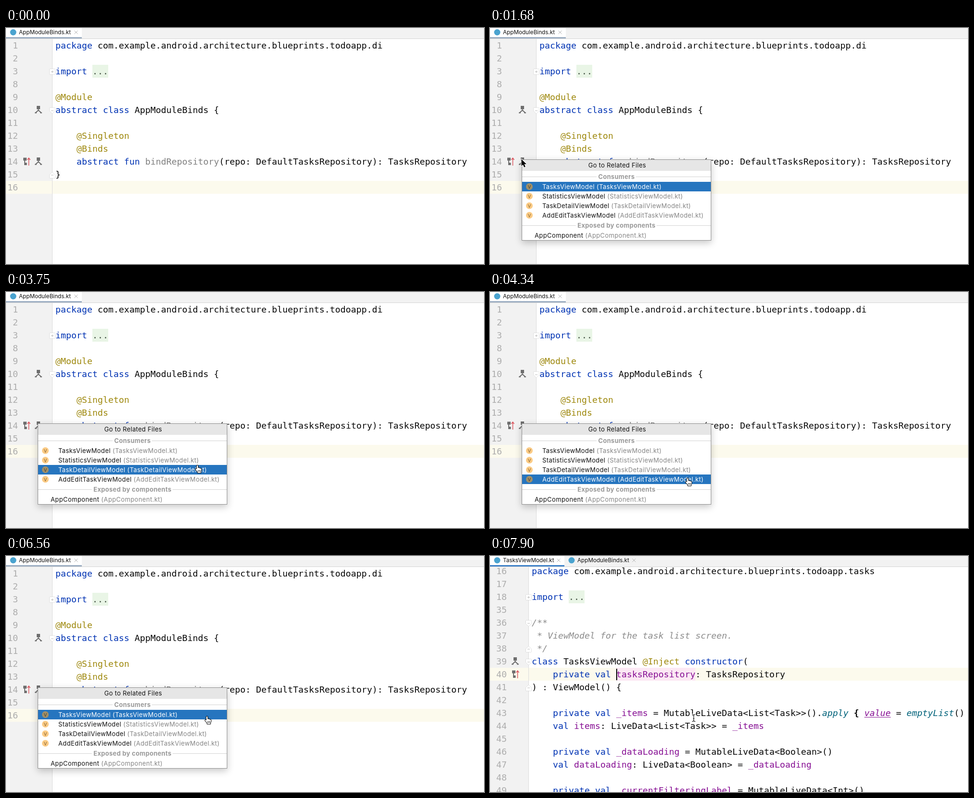
Write an HTML page with a canvas that moves like this. It is 996 by 494 pixels and loops after 8 s.

```html
<!DOCTYPE html>
<html lang="en">
<head>
<meta charset="utf-8">
<title>Go to related files</title>
<style>
html, body { margin: 0; width: 100%; height: 100%; overflow: hidden; background: #fff; }
canvas { display: block; }
</style>
</head>
<body>
<canvas id="stage" width="996" height="494"></canvas>
<script>
const ctx = document.getElementById('stage').getContext('2d');
const W = 996, H = 494, LOOP = 8000;
const CELL = 11, ROW = 27;
const MONO = '18.27px "DejaVu Sans Mono", monospace';
const POPUP_AT = 1680, OPEN_AT = 6860, HIGHLIGHT_AT = 7160, IBEAM_AT = 7900;

// Code markup: ‹style text›
const STYLES = {
  k: { color: '#0033b3' },
  a: { color: '#9e880d' },
  g: { color: '#808080' },
  c: { color: '#8c8c8c', font: 'italic ' },
  p: { color: '#871094' },
  v: { color: '#871094', font: 'italic ', underline: true },
  f: { color: '#00627a', font: 'italic ' },
  b: { color: '#080808', font: 'bold ' },
  d: { color: '#3b4a3b', box: '#e9f5e6' },
  h: { color: '#871094', hot: '#fce8f4' }
};

// Rows: line number, code, fold marker, gutter icons
const bindsFile = {
  top: 23, left: 103, gutter: 96, numberRight: 25, caretRow: 11, daggerX: 67, arrowX: 36,
  rows: [
    [1, '‹k package› com.example.android.architecture.blueprints.todoapp.di'],
    [2, ''],
    [3, '‹k import› ‹d ...›', 'plus'],
    [8, ''],
    [9, '‹a @Module›'],
    [10, '‹k abstract class› AppModuleBinds {', 'down', 'D'],
    [11, ''],
    [12, '    ‹a @Singleton›'],
    [13, '    ‹a @Binds›'],
    [14, '    ‹k abstract fun› ‹g bindRepository›(repo: DefaultTasksRepository): TasksRepository', '', 'DA'],
    [15, '}', 'up'],
    [16, '']
  ]
};
const tasksFile = {
  top: 18, left: 87, gutter: 80, numberRight: 35, caretRow: 8, daggerX: 52, arrowX: 46, caretColumn: 16,
  rows: [
    [16, '‹k package› com.example.android.architecture.blueprints.todoapp.tasks'],
    [17, ''],
    [18, '‹k import› ‹d ...›', 'plus'],
    [35, ''],
    [36, '‹c /**›', 'down'],
    [37, '‹c  * ViewModel for the task list screen.›'],
    [38, '‹c  */›', 'up'],
    [39, '‹k class› TasksViewModel ‹a @Inject› ‹k constructor›(', 'down', 'D'],
    [40, '    ‹k private val› ‹h tasksRepository›: TasksRepository', '', 'A'],
    [41, ') : ViewModel() {', 'up'],
    [42, ''],
    [43, '    ‹k private val› ‹p _items› = MutableLiveData<List<Task>>().‹f apply› ‹b {› ‹v value› = ‹f emptyList›()'],
    [44, '    ‹k val› ‹p items›: LiveData<List<Task>> = ‹p _items›'],
    [45, ''],
    [46, '    ‹k private val› ‹p _dataLoading› = MutableLiveData<Boolean>()'],
    [47, '    ‹k val› ‹p dataLoading›: LiveData<Boolean> = ‹p _dataLoading›'],
    [48, ''],
    [49, '    ‹k private val› ‹p _currentFilteringLabel› = MutableLiveData<Int>()']
  ]
};

const popupRows = [
  ['TasksViewModel', 322], ['StatisticsViewModel', 342], ['TaskDetailViewModel', 362],
  ['AddEditTaskViewModel', 382], ['AppComponent', 424]
];

// Stepped pointer moves; points are [progress, x, y]
const moves = [
  { start: 500, end: 1380, steps: 7, points: [[0, 161, 404], [.143, 156, 404], [.45, 110, 320], [.8, 68, 248], [1, 65, 274]] },
  { start: 2280, end: 3310, steps: 8, points: [[0, 65, 274], [.625, 253, 325], [1, 385, 341]] },
  { start: 3460, end: 4490, steps: 8, points: [[0, 385, 341], [.875, 407, 389], [1, 407, 394]] },
  { start: 4640, end: 4780, steps: 2, points: [[0, 407, 394], [.5, 407, 397], [1, 407, 396]] },
  { start: 5820, end: 6560, steps: 6, points: [[0, 407, 396], [.167, 407, 396], [1, 414, 335]] }
];

function pointerAt(t) {
  const move = moves.filter(m => t >= m.start).pop();
  if (!move) return null;
  const { start, end, steps, points } = move;
  const step = Math.floor((t - start) / (end - start) * (steps - 1) + 0.1) + 1;
  const u = Math.min(1, step / steps);
  const i = Math.max(1, points.findIndex(p => p[0] >= u));
  const [u0, x0, y0] = points[i - 1], [u1, x1, y1] = points[i];
  const k = (u - u0) / (u1 - u0);
  return { x: Math.round(x0 + (x1 - x0) * k), y: Math.round(y0 + (y1 - y0) * k) };
}

function rect(x, y, w, h, color) {
  ctx.fillStyle = color;
  ctx.fillRect(x, y, w, h);
}

function text(value, x, y, color, font, align = 'left', spacing = 0) {
  ctx.font = font;
  ctx.textAlign = align;
  ctx.letterSpacing = spacing + 'px';
  ctx.fillStyle = color;
  ctx.fillText(value, x, y);
  return ctx.measureText(value).width;
}

function shape(path, x, y, fill, stroke, width = 1) {
  const p = new Path2D(path);
  ctx.save();
  ctx.translate(x, y);
  ctx.lineWidth = width;
  ctx.lineJoin = 'round';
  if (stroke) { ctx.strokeStyle = stroke; ctx.stroke(p); }
  if (fill) { ctx.fillStyle = fill; ctx.fill(p); }
  ctx.restore();
}

function circle(x, y, r, color) {
  ctx.beginPath();
  ctx.arc(x, y, r, 0, 7);
  ctx.fillStyle = color;
  ctx.fill();
}

function drawCode(code, left, top, highlighted) {
  let column = 0;
  for (const [, key, styled, plain] of code.matchAll(/‹(\w) ([^›]*)›|([^‹]+)/g)) {
    const value = styled ?? plain;
    const style = STYLES[key] || { color: '#080808' };
    const x = left + column * CELL, width = value.length * CELL;
    const back = style.box || (highlighted && style.hot);
    if (back) rect(x, top, width, ROW, back);
    text(value, x, top + 20, style.color, (style.font || '') + MONO);
    if (style.underline) rect(x, top + 22, width, 1, style.color);
    column += value.length;
  }
}

function drawFold(kind, x, y) {
  const outlines = {
    plus: 'M-5.5-5.5h11v11h-11z',
    down: 'M-5.5-5.5h11v7l-5.5 5l-5.5-5z',
    up: 'M-5.5 6.5h11v-7l-5.5-5l-5.5 5z'
  };
  const bars = kind === 'plus' ? 'M-2.5 0h5M0-2.5v5' : 'M-2.5 .5h5';
  shape(outlines[kind], x, y, '#fff', '#cbcbcb');
  shape(bars, x, y, null, '#bcbcbc');
}

function drawDagger(x, y) {
  shape('M-3.5-9h7v7h-7z', x, y, '#6e6e6e');
  shape('M0-3v3.5M-6.5 6L0 0L6.5 6M-7.5 5.5h4M3.5 5.5h4', x, y, null, '#6e6e6e', 2);
}

function drawImplements(x, y) {
  shape('M0-8.5h7v6h-7zM2-3h2v10h-2zM4 2h3.5v5h-3.5z', x, y, '#6e6e6e');
  shape('M11.5 8v-15M8.5-4l3-4l3 4', x, y, null, '#db5860', 1.5);
}

function drawFile(file, highlighted) {
  const { top, left, gutter, rows, caretRow } = file;
  rect(0, 0, W, H, '#fff');
  rect(0, 0, gutter, H, '#f2f2f2');
  rect(0, top + caretRow * ROW, W, ROW, '#fcfaed');
  rect(gutter, 0, 1, H, '#dcdcdc');
  rows.forEach(([number, code, fold, icons = ''], i) => {
    const y = top + i * ROW;
    text(number, file.numberRight, y + 20, '#adadad', MONO, 'right');
    drawCode(code, left, y, highlighted);
    if (fold) drawFold(fold, gutter + .5, y + 14.5);
    if (icons.includes('D')) drawDagger(file.daggerX + .5, y + 149 - 135);
    if (icons.includes('A')) drawImplements(file.arrowX, y + 14);
  });
  if (file.caretColumn) rect(left + file.caretColumn * CELL, top + caretRow * ROW + 2, 2, ROW - 3, '#000');
}

function drawTabs(tabs, activeWidth, accent) {
  rect(0, 0, W, 22, '#f2f2f2');
  rect(0, 22, W, 1, '#d4d4d4');
  rect(0, 0, activeWidth, 22, '#fff');
  rect(0, 19, activeWidth, 3, accent);
  for (const [label, x, closeX] of tabs) {
    circle(x + 15, 9, 6.5, '#4aa3cf');
    text(label, x + 27, 13, '#111', '11.7px Inter, sans-serif');
    shape('M-3.5-3.5l7 7M3.5-3.5l-7 7', closeX, 9, null, '#b4b4b4');
  }
}

function drawSection(label, y) {
  const font = 'bold 13px Inter, sans-serif';
  const half = text(label, 263.5, y + 5, '#999', font, 'center', .3) / 2 + 3;
  rect(67, y, 263 - half - 67, 1, '#d2d2d2');
  rect(263 + half, y, 460 - 263 - half, 1, '#d2d2d2');
}

function drawPopup(selected) {
  const font = '13px Inter, sans-serif';
  ctx.save();
  ctx.shadowColor = 'rgba(0,0,0,.22)';
  ctx.shadowBlur = 14;
  ctx.shadowOffsetY = 5;
  rect(66, 275, 395, 170, '#8f8f8f');
  ctx.restore();
  rect(67, 276, 393, 168, '#fff');
  rect(67, 276, 393, 23, '#e6e6e6');
  text('Go to Related Files', 265, 292, '#111', font, 'center', .3);
  drawSection('Consumers', 311);
  drawSection('Exposed by components', 413);
  popupRows.forEach(([name, y], i) => {
    const active = i === selected, isComponent = i === 4;
    if (active) rect(67, y, 393, 20, '#2675bf');
    if (!isComponent) {
      circle(82, y + 10, 7, active ? '#a08f68' : '#fbcb85');
      text('V', 82, y + 13.5, active ? '#3f3a2c' : '#7a5a2a', '9.5px Inter, sans-serif', 'center');
    }
    const x = isComponent ? 93 : 109;
    const width = text(name + ' ', x, y + 15, active ? '#fff' : '#111', font, 'left', .4);
    text(`(${name}.kt)`, x + width, y + 15, active ? '#fff' : '#848484', font, 'left', .4);
  });
}

const cursors = {
  arrow({ x, y }) {
    shape('M0 0v14.5l3.3-3l2.4 5.4l2.6-1.1l-2.4-5.3h4.6z', x + .5, y + .5, '#000', '#fff', 2);
  },
  ibeam({ x, y }) {
    const beam = 'M1 1.5q3 0 3.5 2q.5-2 3.5-2M4.5 3.5v11M1 16.5q3 0 3.5-2q.5 2 3.5 2M3 10.5h3';
    shape(beam, x, y, null, '#fff', 3);
    shape(beam, x, y, null, '#222', 1.2);
  },
  hand({ x, y }) {
    shape('M3.5 9V2Q3.5.7 4.8.7Q6 .7 6 2V6.5Q6.3 5.6 7.4 5.8Q8.5 6 8.5 7Q9 6.3 10 6.6Q11 6.9 11 7.8Q11.7 7.3 12.5 7.8Q13.2 8.3 13.2 9.2Q13.3 12 11.8 14V16.5H5.3V14.5Q3 12 1 9.7Q.4 8.5 1.3 8Q2.2 7.6 3.5 9Z',
      x, y, '#fff', '#000', 2);
    shape('M6.2 11v3M8.4 11v3M10.5 11v3', x, y, null, '#000', .9);
  }
};

function drawPointer(pointer, t) {
  const popup = t >= POPUP_AT;
  if (t >= IBEAM_AT) cursors.ibeam({ x: 420, y: 330 });
  else if (popup && pointer.y >= 306) cursors.hand(pointer);
  else if (!popup && pointer.x > 96) cursors.ibeam(pointer);
  else cursors.arrow(pointer);
}

function draw(t) {
  const pointer = pointerAt(t);
  if (t < OPEN_AT) {
    drawFile(bindsFile);
    drawTabs([['AppModuleBinds.kt', 0, 146]], 158, '#9fb0c4');
    if (t >= POPUP_AT) drawPopup([342, 362, 382, 395].filter(limit => pointer.y >= limit).length);
  } else {
    drawFile(tasksFile, t >= HIGHLIGHT_AT);
    drawTabs([['TasksViewModel.kt', 0, 143], ['AppModuleBinds.kt', 155, 300]], 155, '#4083c9');
  }
  if (pointer) drawPointer(pointer, t);
}

const begin = performance.now();
function tick() {
  draw((performance.now() - begin) % LOOP);
  requestAnimationFrame(tick);
}
tick();
</script>
</body>
</html>
```
